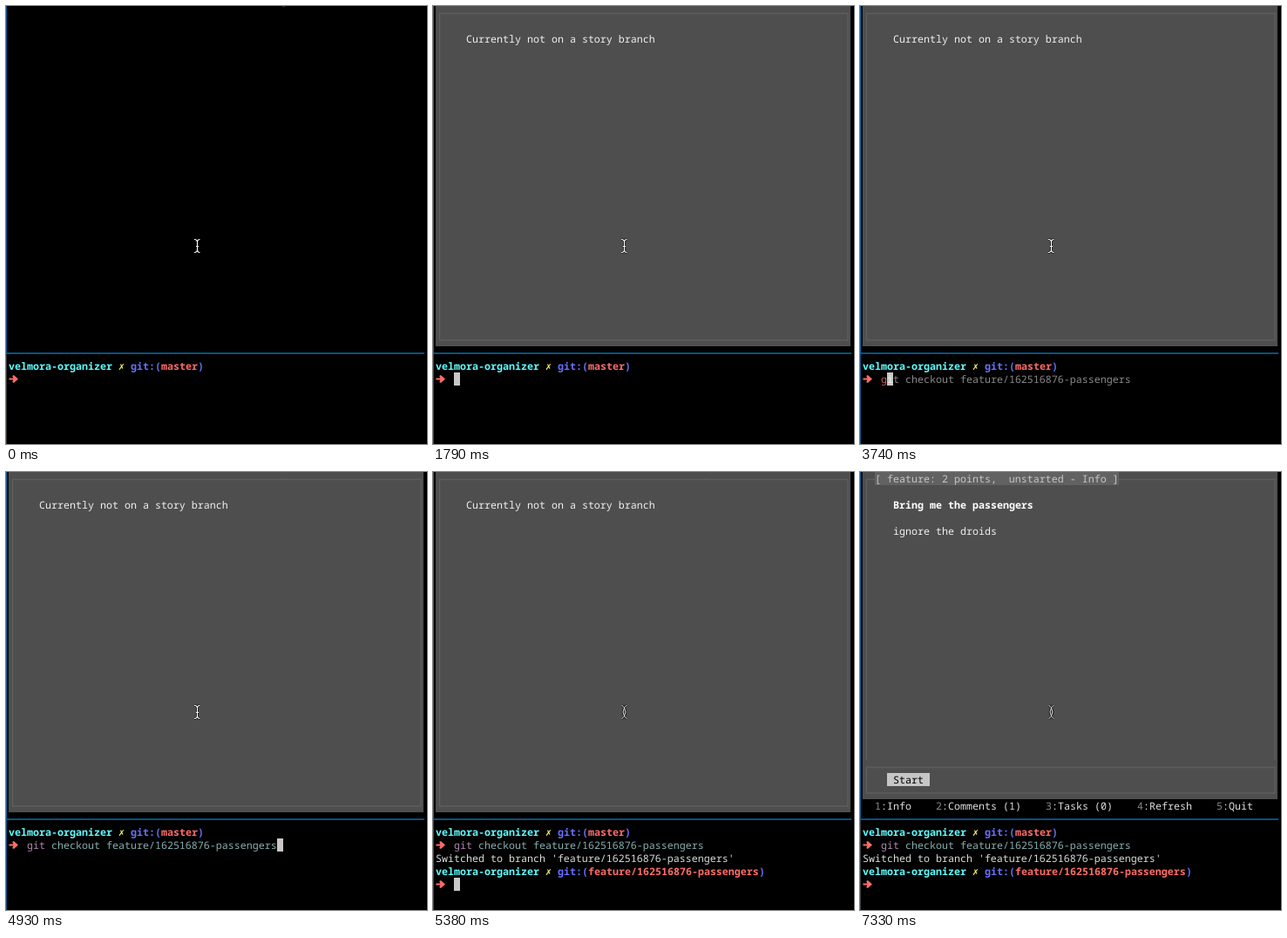
These frames come from a looping animation (483x502 px, 8 s). An HTML page:

```html
<!DOCTYPE html>
<html lang="en">
<head>
<meta charset="utf-8">
<title>Terminal session</title>
<style>
  html, body { margin: 0; width: 100%; height: 100%; overflow: hidden; background: #000; }
  svg { display: block; width: 483px; height: 502px; }
  text {
    font: 500 11.667px "Noto Sans Mono", "DejaVu Sans Mono", monospace;
    font-variant-ligatures: none;
    text-rendering: geometricPrecision;
    white-space: pre;
  }
  .bold { font-weight: 700; }
</style>
</head>
<body>
<svg id="stage" viewBox="0 0 483 502"></svg>
<script>
const LOOP = 8000, CELL = 7, ROW = 15;
const stage = document.getElementById('stage');
const timed = [];

// Key moments in ms
const PANEL = 750, FOCUS = 1790, KEY1 = 3740, KEY2 = 3890, KEY3 = 4040,
      ACCEPT = 4930, ENTER = 5230, DONE = 5380, STORY = 5530, BLUR = 7330;

const RED = '#ff6d67', CYAN = '#5ffdff', YELLOW = '#fefb67', BLUE = '#6871ff';
const GREY = '#4e4e4e', EDGE = '#5e5e5e', BLOCK = '#c7c7c7', WHITE = '#f0f0f0';
const MAUVE = '#af87af', TEAL = '#87afaf', HINT = '#8a8a8a';
const BRANCH = 'feature/162516876-passengers';

function add(tag, attrs, from = 0, to = LOOP) {
  const el = document.createElementNS('http://www.w3.org/2000/svg', tag);
  for (const key in attrs) el.setAttribute(key, attrs[key]);
  stage.appendChild(el);
  if (from > 0 || to < LOOP) timed.push({ el, from, to });
  return el;
}

function box(x, y, width, height, fill, from, to) {
  add('rect', { x, y, width, height, fill }, from, to);
}

function line(d, stroke, width, from, to) {
  add('path', { d, stroke, 'stroke-width': width, fill: 'none' }, from, to);
}

function text(x, y, str, fill, from, to, bold) {
  add('text', { x, y, fill, class: bold ? 'bold' : '' }, from, to).textContent = str;
}

// Row 0 is the first prompt line
const rowTop = row => 405 + row * ROW;
const rowBase = row => rowTop(row) + 12;

function cursor(x, row, from, to) {
  box(x, rowTop(row), CELL, ROW, BLOCK, from, to);
}

// Writes coloured runs one after another on the cell grid
function runs(x, y, parts, from, to, bold) {
  for (const [str, fill] of parts) {
    text(x, y, str, fill, from, to, bold);
    x += str.length * CELL;
  }
}

function prompt(row, branch, from, to) {
  const y = rowBase(row);
  runs(3, y, [['velmora-organizer ', CYAN], ['✗ ', YELLOW], ['git:(', BLUE],
    [branch, RED], [')', BLUE]], from, to, true);
  const mid = rowTop(row + 1) + 7.5;
  add('path', {
    d: `M3.5 ${mid - 1.1}H8.4L7.2 ${mid - 3.6}L8.9 ${mid - 4.4}L14 ${mid}` +
       `L8.9 ${mid + 4.4}L7.2 ${mid + 3.6}L8.4 ${mid + 1.1}H3.5Z`,
    fill: RED
  }, from, to);
}

function pane() {
  box(3, 0, 476, 390, GREY, PANEL, STORY);
  line('M7.5 8.5H476V383H7.5Z', EDGE, 1.5, PANEL, STORY);
  text(38, 42, 'Currently not on a story branch', WHITE, PANEL, STORY);
  box(317, 0, 3, 0.6, '#555', 0, STORY);

  box(3, 0, 476, 375, GREY, STORY);
  line('M7.5 330V8.5H476V330M7.5 338.5H476V368H7.5Z', EDGE, 1.5, STORY);
  box(17, 0, 280, ROW, '#626262', STORY);
  text(17, 12, '[ feature: 2 points,  unstarted - Info ]', '#c6c6c6', STORY);
  text(38, 42, 'Bring me the passengers', '#fff', STORY, LOOP, true);
  text(38, 72, 'ignore the droids', WHITE, STORY);
  box(31, 345, 49, ROW, '#c6c6c6', STORY);
  text(38, 357, 'Start', '#000', STORY, LOOP);

  const menu = [[17, 'Info'], [87, 'Comments (1)'], [213, 'Tasks (0)'],
                [318, 'Refresh'], [409, 'Quit']];
  menu.forEach(([x, label], i) =>
    runs(x, 387, [[String(i + 1), HINT], [':' + label, '#e0e0e0']], STORY));
}

function dividers() {
  box(0, 397.3, 480, 1.5, '#0b6cab');
  const spans = [[0, FOCUS], [FOCUS, BLUR], [BLUR, LOOP]];
  spans.forEach(([from, to], i) => {
    const lit = i === 1;
    box(0, 0, 1, 398, lit ? '#0a68a8' : '#075d98', from, to);
    box(0, 398, 1, 104, lit ? '#07558a' : '#3a3f44', from, to);
  });
}

function shell() {
  prompt(0, 'master');
  const y = rowBase(1), rest = 't checkout ' + BRANCH;

  cursor(24, 1, FOCUS, KEY1);
  cursor(31, 1, KEY1, KEY2);
  cursor(45, 1, KEY2, KEY3);
  cursor(52, 1, KEY3, ACCEPT);
  cursor(311, 1, ACCEPT, ENTER);
  cursor(3, 2, ENTER, DONE);
  cursor(24, 3 + 1, DONE, BLUR);

  runs(24, y, [['g', '#c4605c'], ['i', WHITE], [rest, HINT]], KEY1, KEY2);
  runs(24, y, [['git', MAUVE], [' checkout ' + BRANCH, HINT]], KEY2, KEY3);
  runs(24, y, [['git ', MAUVE], ['c', WHITE], ['heckout ' + BRANCH, HINT]], KEY3, ACCEPT);
  runs(24, y, [['git ', MAUVE], ['checkout ' + BRANCH, TEAL]], ACCEPT);

  text(3, rowBase(2), `Switched to branch '${BRANCH}'`, '#dcdcdc', DONE);
  prompt(3, BRANCH, DONE);
}

function pointer() {
  const beam = 'M216 267.5Q219.5 267.5 219.5 271V279Q219.5 282.5 216 282.5' +
               'M222.5 267.5Q219.5 267.5 219.5 271M219.5 279Q219.5 282.5 222.5 282.5M218 275.5H221';
  line(beam, '#111', 2.6, PANEL, DONE);
  line(beam, '#fff', 1.1, 0, DONE);

  const loop = 'M216.5 267.5Q218 267.8 219.5 270.2Q222.5 275 219.5 279.8Q218 282.2 216.5 282.5' +
               'M222.5 267.5Q221 267.8 219.5 270.2Q216.5 275 219.5 279.8Q221 282.2 222.5 282.5';
  line(loop, '#111', 2.4, DONE);
  line(loop, '#e8e8e8', 1, DONE);
}

pane();
dividers();
shell();
pointer();

const start = performance.now();
function draw() {
  const t = (performance.now() - start) % LOOP;
  for (const { el, from, to } of timed)
    el.style.visibility = t >= from && t < to ? 'visible' : 'hidden';
  requestAnimationFrame(draw);
}
draw();
</script>
</body>
</html>
```
